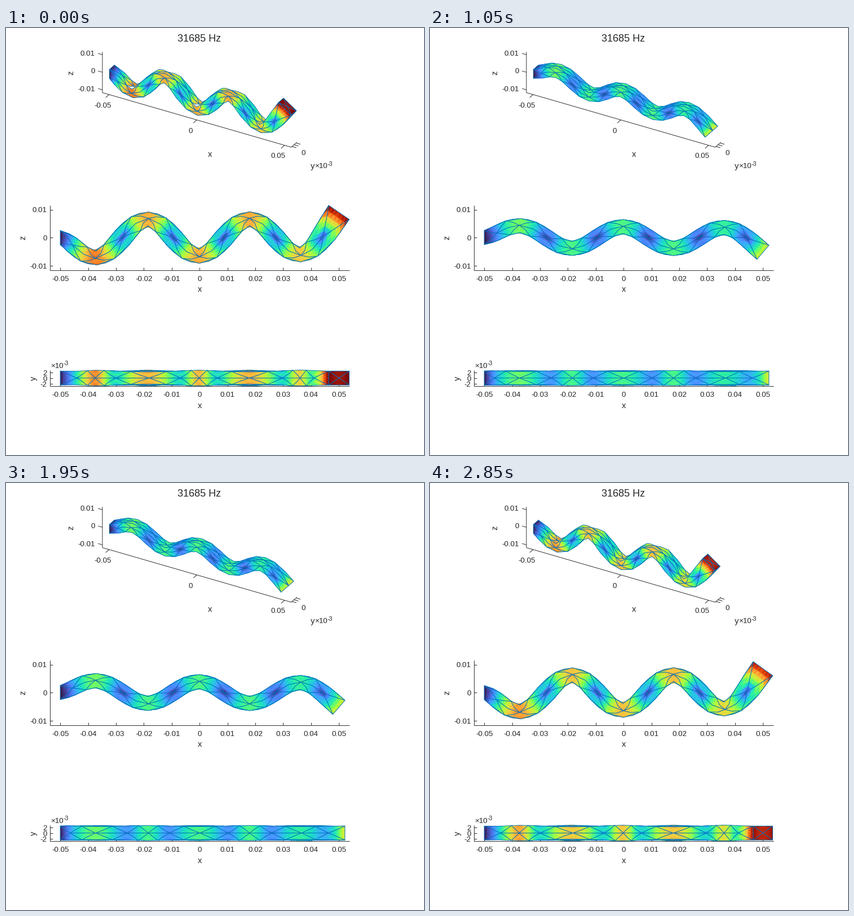
Animation, 741 px wide and 756 px high, one loop 3 s. Source, as a matplotlib script:

```python
import numpy as np
import matplotlib
import matplotlib.pyplot as plt
from matplotlib.animation import FuncAnimation
from matplotlib.collections import PolyCollection

WIDTH, HEIGHT, DPI = 741, 756, 96
FRAMES, INTERVAL = 20, 150
PT = 72 / DPI
INK = "#262626"
EDGE = matplotlib.colors.to_rgba("#0072BD")
TURBO = matplotlib.colormaps["turbo"]

# Clamped beam: length, half thickness, Poisson ratio (metres)
LENGTH, HALF, NU = 0.1, 0.0025, 0.3
# Timoshenko bending mode: wave number, decay rate, shear corrected slopes
K, Q, G, H = 171.63, 152.7, 144.5, 183.2
PHASE = np.arctan(H / G)
TIP = 0.628
AMP = 0.00674
COLOR_MAX = 0.0095

plt.rcParams["font.family"] = "Liberation Sans"


# ---------- beam ----------

def displacement(p):
    """Mode shape displacement at the points p (..., 3)."""
    x, y, z = np.moveaxis(p, -1, 0)
    d = x + LENGTH / 2
    wave = K * d + PHASE
    root = np.cos(PHASE) * np.exp(-Q * d)
    tip = TIP * np.exp(-Q * (LENGTH - d))
    w = AMP * (np.cos(wave) - root + tip)
    slope = AMP * (-G * np.sin(wave) + H * root + H * tip)
    bend = AMP * (-K * G * np.cos(wave) - Q * H * root + Q * H * tip)
    bend = bend * NU * (1 - np.exp(-d / 0.003))
    return np.stack([-z * slope, bend * y * z, w + bend * (z**2 - y**2) / 2], -1)


def strip_triangles():
    """Triangles (x, v) of one long side, v across it from -1 to 1."""
    mid = np.array([-45.6, -37.4, -27.5, -18.3, -9.4, 0,
                    8.8, 17.9, 27.3, 36.4, 44.3]) / 1000
    rim = np.concatenate([[-LENGTH / 2], (mid[1:] + mid[:-1]) / 2, [LENGTH / 2]])
    tris = []
    for v in (-1, 1):
        for i, c in enumerate(mid):
            tris.append([(rim[i], v), (rim[i + 1], v), (c, 0)])
        for i in range(1, len(mid)):
            tris.append([(mid[i - 1], 0), (mid[i], 0), (rim[i], v)])
    for x, c in ((rim[0], mid[0]), (rim[-1], mid[-1])):
        tris.append([(x, -1), (x, 1), (c, 0)])
    return tris


def build_mesh():
    """Six-node surface triangles, wound so that normals point outwards."""
    tris = []
    for side in (-HALF, HALF):
        for tri in strip_triangles():
            tris.append([(x, v * HALF, side) for x, v in tri])
            tris.append([(x, side, v * HALF) for x, v in tri])
    ring = [(-HALF, -HALF), (HALF, -HALF), (HALF, HALF), (-HALF, HALF)]
    for x in (-LENGTH / 2, LENGTH / 2):
        for a, b in zip(ring, ring[1:] + ring[:1]):
            tris.append([(x, *a), (x, *b), (x, 0, 0)])
    t = np.array(tris)
    normal = np.cross(t[:, 1] - t[:, 0], t[:, 2] - t[:, 0])
    flip = (normal * t.mean(axis=1)).sum(axis=1) < 0
    t[flip] = t[flip][:, ::-1]
    return np.concatenate([t, (t + np.roll(t, -1, axis=1)) / 2], axis=1)


def split_weights(n):
    """Node weights of the small shading triangles: (piece, corner, node)."""
    grid = []
    for i in range(n):
        for j in range(n - i):
            grid.append([(i, j), (i + 1, j), (i, j + 1)])
            if i + j < n - 1:
                grid.append([(i + 1, j), (i + 1, j + 1), (i, j + 1)])
    bary = np.array([[(i, j, n - i - j) for i, j in tri] for tri in grid]) / n
    quarters = [(0, 3, 5), (3, 1, 4), (5, 4, 2), (3, 4, 5)]
    return np.concatenate([bary @ np.eye(6)[list(q)] for q in quarters])


MESH = build_mesh()
MODE = displacement(MESH)
SIZE = np.linalg.norm(MODE, axis=-1) / COLOR_MAX
WEIGHTS = split_weights(3)
OUTLINE = [0, 3, 1, 4, 2, 5]


class View:
    """Orthographic view of the beam in pixel coordinates."""

    def __init__(self, ax, az, el, center, scale):
        az, el = np.radians([az, el])
        ca, sa, ce, se = np.cos(az), np.sin(az), np.cos(el), np.sin(el)
        self.axes = np.array([[ca, sa, 0],
                              [-sa * se, ca * se, ce],
                              [sa * ce, -ca * ce, se]])
        self.center, self.scale = np.array(center), scale
        self.body = PolyCollection([], zorder=3)
        ax.add_collection(self.body, autolim=False)

    def project(self, p):
        q = np.asarray(p) @ self.axes.T * self.scale
        return self.center + q[..., :2] * [1, -1], q[..., 2]

    def draw(self, points, level):
        flat, depth = self.project(points)
        a, b = flat[:, 1] - flat[:, 0], flat[:, 2] - flat[:, 0]
        front = np.flatnonzero(a[:, 1] * b[:, 0] - a[:, 0] * b[:, 1] > 0.5)
        order = front[np.argsort(depth[front].mean(axis=1))]
        pieces = np.einsum("sck,tkd->tscd", WEIGHTS, flat[order])
        shade = np.einsum("sck,tk->ts", WEIGHTS, level[order]) / 3
        rims = flat[order][:, OUTLINE]

        count, parts = shade.shape
        verts = []
        for tri, rim in zip(pieces, rims):
            verts.extend(tri)
            verts.append(rim)
        faces = np.zeros((count, parts + 1, 4))
        faces[:, :parts] = TURBO(np.clip(shade, 0, 1))
        edges = faces.copy()
        edges[:, parts] = EDGE
        widths = np.full((count, parts + 1), 0.35)
        widths[:, parts] = 0.7

        self.body.set_verts(verts)
        self.body.set_facecolor(faces.reshape(-1, 4))
        self.body.set_edgecolor(edges.reshape(-1, 4))
        self.body.set_linewidth(widths.ravel())


# ---------- stage ----------

fig = plt.figure(figsize=(WIDTH / DPI, HEIGHT / DPI), dpi=DPI, facecolor="white")
ax = fig.add_axes([0, 0, 1, 1])
ax.set_xlim(0, WIDTH)
ax.set_ylim(HEIGHT, 0)
ax.axis("off")


def text(x, y, s, size=13.33, ha="center", va="baseline", **kw):
    ax.text(x, y, s, fontsize=size * PT, ha=ha, va=va, color=INK, **kw)


def line(*points):
    xs, ys = zip(*points)
    ax.plot(xs, ys, color=INK, lw=0.7, solid_capstyle="butt", zorder=1)


def power(x, y):
    text(x, y, "×10", ha="left")
    text(x + 23, y - 5, "-3", size=10.6, ha="left")


def label(value):
    return f"{value:g}"


def flat_axes(top, bottom, ticks, zero, name, name_x):
    """Plain axes with ticks pointing inwards; ticks maps text to height."""
    line((77.5, top), (77.5, bottom), (609, bottom))
    for i in range(-5, 6):
        x = 343.2 + i * 49.4
        line((x, bottom), (x, bottom - 5))
        text(x, bottom + 19.4, label(i / 100))
    for s, y in ticks.items():
        line((77.5, y), (82.5, y))
        text(72.5, y + 5, s, ha="right")
    text(343.5, bottom + 38.7, "x", size=14.67)
    text(name_x, zero, name, size=14.67, va="center", rotation=90)


def solid_axes(view):
    """Three-dimensional axes with ticks pointing outwards."""
    lx, ly, lz = 0.0538, 0.0028, 0.0116

    def spot(x, y, z):
        return view.project((x, y, z))[0]

    def tick(start, direction):
        step = spot(*direction) - spot(0, 0, 0)
        line(start, start + 8 * step / np.hypot(*step))

    line(spot(-lx, -ly, lz), spot(-lx, -ly, -lz),
         spot(lx, -ly, -lz), spot(lx, ly, -lz))
    for z, y in ((0.01, 44), (0, 75.5), (-0.01, 107)):
        tick(spot(-lx, -ly, z), (-1, 0, 0))
        text(157.5, y + 4.8, label(z), ha="right")
    for i in (-1, 0, 1):
        tick(spot(i * 0.05, -ly, -lz), (0, -1, 0))
        text(327.5 + i * 155.5, 185.6 + i * 44.9, label(i * 0.05))
        tick(spot(lx, i * 0.002, -lz), (1, 0, 0))
    text(527, 224.8, "0")
    text(361.5, 228, "x", size=14.67)
    text(543.5, 248.5, "y", size=14.67)
    text(115, 79, "z", size=14.67, va="center", rotation=90)
    power(547, 248.5)


views = [
    View(ax, 30, 30, (343.3, 122.3), 3592),
    View(ax, 0, 0, (343.2, 371), 4940),
    View(ax, 0, 90, (343.2, 619.7), 4940),
]

text(342.5, 24.5, "31685 Hz", size=18)
solid_axes(views[0])
flat_axes(314, 428.5, {"0.01": 321.5, "0": 371, "-0.01": 420.5}, 371, "z", 30)
flat_axes(605.5, 634, {"2": 609.8, "0": 619.7, "-2": 629.6}, 620, "y", 49)
power(79, 602)


def update(n):
    phase = np.cos(2 * np.pi * n / FRAMES)
    points = MESH + phase * MODE
    level = abs(phase) * SIZE
    for view in views:
        view.draw(points, level)
    return [view.body for view in views]


anim = FuncAnimation(fig, update, frames=FRAMES, interval=INTERVAL,
                     repeat=True, repeat_delay=0, blit=False)
plt.show()
```
